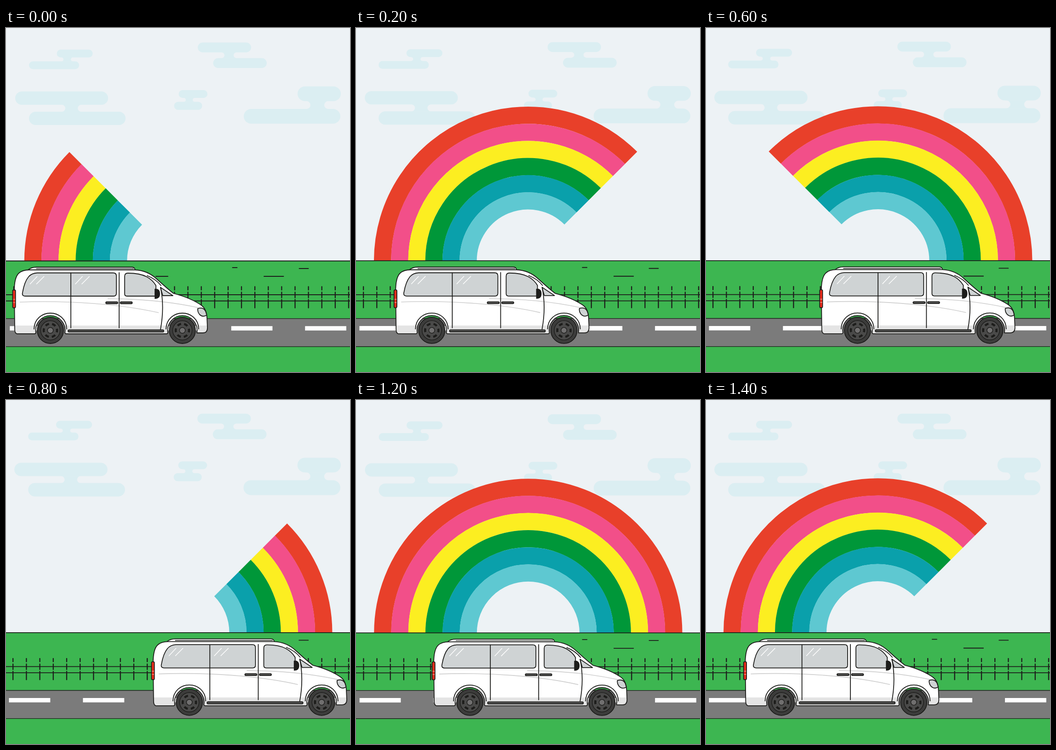
These frames come from a looping animation (748x748 px, 1.6 s). An HTML page:

```html
<!DOCTYPE html>
<html lang="en">
<head>
<meta charset="utf-8">
<title>Van and rainbow</title>
<style>
html, body { margin: 0; width: 100%; height: 100%; overflow: hidden; background: #edf2f5; }
svg { display: block; width: 100vw; height: 100vh; }
.ink { stroke: #1d1d1b; stroke-width: 1.8; fill: none; stroke-linecap: round; stroke-linejoin: round; }
.glass { fill: #cfd3d4; }
.dark { fill: #575756; }
</style>
</head>
<body>
<svg viewBox="0 0 748 748">
  <defs>
    <path id="body" d="M24 665 Q19 664 19 655 L18 572 Q18 542 28 533 Q36 526 50 526 H280 Q308 527 328 546 Q350 566 364 577 Q402 587 425 603 Q436 611 437 630 L438 652 Q438 663 428 663 H415 A32 32 0 1 0 352 663 L350 665 H130 L128 663 A32 32 0 1 0 65 663 L63 665 Z"/>
    <clipPath id="inside"><use href="#body"/></clipPath>
    <g id="wheel">
      <circle r="28.5" fill="#3c3c3b" class="rim"/>
      <circle r="28.5" class="ink"/>
      <circle r="21" fill="#4a4a49" stroke="#1d1d1b" stroke-width="1.4"/>
      <circle r="14.5" fill="none" stroke="#1d1d1b" stroke-width="4.6" stroke-dasharray="8.4 6.784" stroke-dashoffset="4.2"/>
      <circle r="6.3" fill="#706f6f" stroke="#1d1d1b" stroke-width="1.4"/>
      <path class="ink" d="M-35.5 -3 C-35 -25 -18 -37.500 0 -37.500 S35 -25 35.500 -3"/>
    </g>
    <path id="shine" d="M52 557 L68 540 M66 557 L83 540" stroke="#fff" stroke-width="1.5"/>
  </defs>

  <g id="scene">
    <rect x="-9" y="-9" width="766" height="766" fill="#edf2f5"/>
    <g id="clouds" fill="#dbeef2"></g>
    <g id="rainbow" fill="none" stroke-width="37.4"></g>

    <rect x="-9" y="506.5" width="766" height="260" fill="#3db651"/>
    <path class="ink" d="M-9 506.500 H757"/>
    <path class="ink" stroke-linecap="butt" d="M326 540 H352 M492.500 521 H502.500 M561 540 H603.500 M637.500 523 H657.500"/>
    <path class="ink" d="M-9 580 H757 M-9 593.500 H757"/>
    <path id="posts" stroke="#1d1d1b" stroke-width="2.3" stroke-linecap="round"/>

    <rect x="-9" y="631.8" width="766" height="61" fill="#7b7b7b"/>
    <path class="ink" style="stroke-width:1.3" d="M-9 631.800 H757 M-9 692.800 H757"/>
    <path d="M8.300 653 H748" stroke="#fff" stroke-width="9.6" stroke-dasharray="89.6 70.9"/>

    <g id="van">
      <path class="ink" style="fill:#fff" d="M48 526 Q55 520 66 520 H274 Q280 520 281 527"/>
      <path class="ink" style="stroke-width:1.4" d="M66 523.300 H277"/>
      <use href="#body" fill="#fff"/>
      <rect y="647" width="450" height="20" fill="#e4e4e4" clip-path="url(#inside)"/>
      <path d="M30 596 Q110 593 190 599 T332 619 M221 588.500 Q330 589 418 608" fill="none" stroke="#cfcfcf" stroke-width="1.6"/>
      <use href="#body" class="ink"/>

      <g class="ink">
        <path class="glass" d="M42 583 Q34 583 36 575 Q40 552 49 541 Q56 533 68 532.500 H233 Q240 532.500 240 539 V577 Q240 583 234 583 Z"/>
        <path class="glass" d="M263 583 Q258 583 258 578 V540 Q258 533 265 533 Q291 533 306 541 Q319 548 326 560 V583 Z"/>
        <path class="glass" d="M336 564 L363 582 H341 Q338 573 336 564 Z"/>
        <path d="M141 532.500 V652 M246 532 V652 M307 538.500 Q326 546 337 560 M336 564 Q345 606 336 655"/>
        <path fill="#1d1d1b" d="M324 568 Q334 567 334 578 Q334 588 324 588 Z"/>
        <path class="glass" d="M417 610 Q429 606 434 616 L436.500 624 Q428 630 421 623 Q416 617 417 610 Z"/>
        <rect class="dark" x="217" y="595.5" width="26" height="4" rx="2"/>
        <rect class="dark" x="248.500" y="595.5" width="26" height="4" rx="2"/>
        <rect class="dark" x="135" y="656.5" width="208" height="4.6" rx="2.3"/>
        <rect x="14.5" y="569.500" width="6.2" height="39" rx="2.5" fill="#ee2d1c"/>
      </g>
      <path d="M15.500 590 H20 M15.500 597 H20" stroke="#f7b5a8" stroke-width="1.2"/>
      <use href="#shine"/>
      <use href="#shine" x="98.5"/>
      <use href="#wheel" x="96.5" y="657.5"/>
      <use href="#wheel" x="383.5" y="657.5"/>
    </g>
  </g>
</svg>

<script>
const $ = id => document.getElementById(id);

// Pill: left, right, top, bottom
const pill = (l, r, t, b) =>
  `<rect x="${l}" y="${t}" width="${r - l}" height="${b - t}" rx="${(b - t) / 2}"/>`;

// Two pills joined by a neck with round hollows on both sides
function cloud(top, bottom, a, b) {
  const y1 = top[3], y2 = bottom[2], r = (y2 - y1) / 2;
  return pill(...top) + pill(...bottom) +
    `<path d="M${a - r} ${y1 - .3} V${y1} A${r} ${r} 0 0 1 ${a - r} ${y2} v.3 H${b + r} V${y2} A${r} ${r} 0 0 1 ${b + r} ${y1} v-.3 Z"/>`;
}
$("clouds").innerHTML =
  cloud([110.500, 188.500, 47, 64], [50, 159, 72.500, 89.500], 125, 141) +
  cloud([417, 533, 31.500, 53], [450.500, 567, 65.500, 87], 475, 495) +
  cloud([20, 222, 138, 167], [50, 260, 182, 211], 129, 156) +
  cloud([375.500, 438, 135, 152], [365.500, 426.500, 160.500, 178], 391, 406) +
  cloud([634, 728, 127, 159], [517, 727, 176, 208], 662, 692);

let posts = "";
for (let i = 0; i < 26; i++)
  posts += `M${17 + i * 29.12} 562.500 v7 m0 5 v12 m0 4 v18 `;
$("posts").setAttribute("d", posts);

const colors = ["#e8402a", "#f24f89", "#fcee21", "#009739", "#0aa0ab", "#5ec8d1"];
const bands = colors.map(c => {
  const p = document.createElementNS("http://www.w3.org/2000/svg", "path");
  p.setAttribute("stroke", c);
  return $("rainbow").appendChild(p);
});

// Arc from a to b, in eighths of a turn from the left foot
function drawRainbow(a, b) {
  bands.forEach((p, i) => {
    const r = 316.200 - i * 37.2;
    const at = k => `${374.700 - r * Math.cos(k * Math.PI / 4)} ${506.500 - r * Math.sin(k * Math.PI / 4)}`;
    p.setAttribute("d", `M${at(a)} A${r} ${r} 0 0 1 ${at(b)}`);
  });
}

// Van offset, rainbow start and end, slight zoom of the scene
const poses = [
  [0, 0, 1, 1],
  [69, 0, 3, 1.0012],
  [151.500, 0, 4, 1.0025],
  [234, 1, 4, 1.0025],
  [303, 3, 4, 1.0025],
  [234, 1, 4, 1],
  [151.500, 0, 4, 1.0008],
  [69, 0, 3, 1.0025]
];

let shown = -1;
const start = performance.now();
function tick(now) {
  const step = Math.floor(Math.max(0, now - start) / 200) % poses.length;
  if (step !== shown) {
    shown = step;
    const [x, a, b, zoom] = poses[step];
    $("van").setAttribute("transform", `translate(${x})`);
    $("scene").setAttribute("transform", `translate(748 748) scale(${zoom}) translate(-748 -748)`);
    drawRainbow(a, b);
  }
  requestAnimationFrame(tick);
}
tick(start);
</script>
</body>
</html>
```
